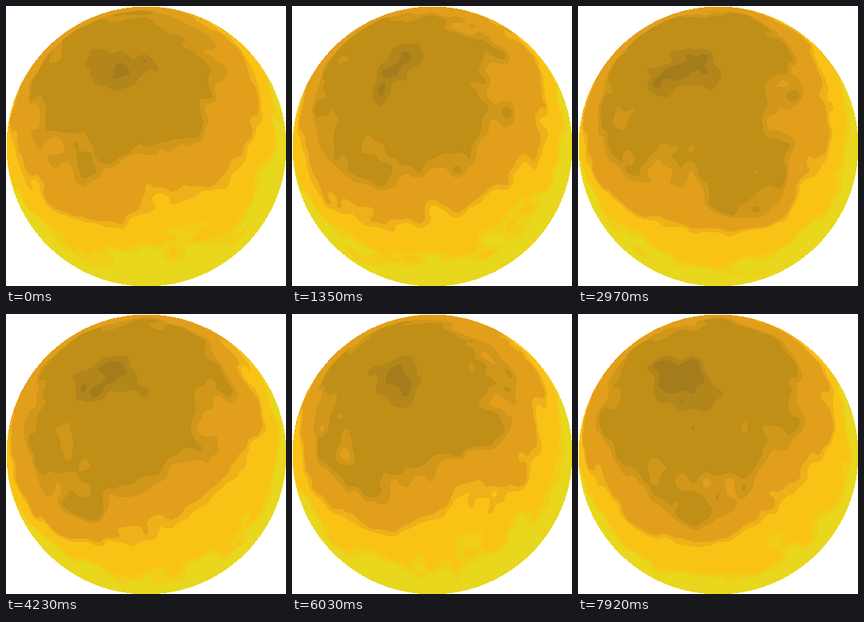
Write an HTML page with a canvas that moves like this. It is 350 px wide and 350 px high and loops after 8 s.

```html
<!DOCTYPE html>
<html>
<head>
<meta charset="utf-8">
<style>
  html, body { margin: 0; width: 100%; height: 100%; overflow: hidden; background: #fff; }
  canvas { display: block; width: 100%; height: 100%; }
</style>
</head>
<body>
<canvas id="stage" width="350" height="350"></canvas>
<script>
const SIZE = 350, MID = 175.5, RADIUS = 174.9;
const LOOP = 8000, STEP = 90;
const FOCUS = { x: 150, y: 120 };   // centre of the shadow
const LIGHT_ANGLE = 69;             // brightest direction, degrees clockwise from right
const COLORS = [[164, 124, 28], [191, 143, 23], [226, 159, 28], [249, 195, 22], [232, 215, 28]];

// The shadow's lower border swells (or, if negative, dents) around one wandering angle.
const SWELLS = [
  { at: 0, angle: 75, size: -0.2 },
  { at: 1350, angle: 130, size: 0.02 },
  { at: 2970, angle: 60, size: 0.27 },
  { at: 4230, angle: 122, size: 0.17 },
  { at: 6030, angle: 65, size: -0.17 },
  { at: 7110, angle: 122, size: 0.22 },
  { at: 7920, angle: 85, size: 0.22 }
];

const mix = (a, b, k) => a + (b - a) * k;
const smooth = k => k * k * (3 - 2 * k);

function hash(x, y, z) {
  let h = Math.imul(x, 374761393) ^ Math.imul(y, 668265263) ^ Math.imul(z, 1274126177);
  h = Math.imul(h ^ (h >>> 13), 1103515245);
  return ((h ^ (h >>> 16)) >>> 0) / 2147483648 - 1;
}

function noise(x, y, z) {
  const ix = Math.floor(x), iy = Math.floor(y), iz = Math.floor(z);
  const fx = smooth(x - ix), fy = smooth(y - iy), fz = smooth(z - iz);
  const row = (j, k) => mix(hash(ix, iy + j, iz + k), hash(ix + 1, iy + j, iz + k), fx);
  return mix(mix(row(0, 0), row(1, 0), fy), mix(row(0, 1), row(1, 1), fy), fz);
}

// Fixed geometry and lighting of every pixel on the globe.
const pixels = [];
for (let y = 0; y < SIZE; y++) {
  for (let x = 0; x < SIZE; x++) {
    const sx = (x + 0.5 - MID) / RADIUS, sy = (y + 0.5 - MID) / RADIUS;
    const depth = 1 - sx * sx - sy * sy;
    if (depth < 0) continue;
    const dx = x - FOCUS.x, dy = y - FOCUS.y, r = Math.hypot(dx, dy) || 1;
    const ox = FOCUS.x - MID, oy = FOCUS.y - MID;
    const along = (ox * dx + oy * dy) / r;
    const rim = Math.sqrt(along * along - ox * ox - oy * oy + RADIUS * RADIUS) - along;
    const angle = Math.atan2(dy, dx) * 180 / Math.PI;
    const light = (1 + Math.cos((angle - LIGHT_ANGLE) * Math.PI / 180)) / 2;
    pixels.push({
      sx, sy, sz: Math.sqrt(depth), angle, reach: Math.min(1, r / rim),
      brown: 0.96 - 0.55 * light ** 1.5,
      orange: 1.02 - 0.4 * light ** 2.5,
      dark: 0.75 * Math.exp(-(((x - 122) / 55) ** 2 + ((y - 73) / 44) ** 2)),
      index: (y * SIZE + x) * 4
    });
  }
}

function swellAt(time) {
  const i = Math.max(1, SWELLS.findIndex(s => s.at >= time));
  const a = SWELLS[i - 1], b = SWELLS[i];
  const k = smooth((time - a.at) / (b.at - a.at));
  return { angle: mix(a.angle, b.angle, k), size: mix(a.size, b.size, k) };
}

// Level 0 is the darkest zone, 4 the brightest.
function levelAt(p, swell, time) {
  const bulge = swell.size * Math.exp(-(((p.angle - swell.angle) / 28) ** 2));
  const brown = p.brown + bulge, orange = p.orange + bulge / 2, q = p.reach;
  let level;
  if (q < brown) level = 1.5 + 0.5 * (q / brown) ** 2 - p.dark;
  else if (q < orange) level = 2 + (q - brown) / (orange - brown);
  else level = 3 + (q - orange) / Math.max(0.08, 0.65 * (1 - orange));
  const x = p.sx + 7, y = p.sy + 3, z = p.sz + time / 4300;
  return level + 0.34 * noise(x * 5, y * 5, z * 5) + 0.18 * noise(x * 11, y * 11, z * 11);
}

const ctx = document.getElementById("stage").getContext("2d");
const image = ctx.createImageData(SIZE, SIZE);
image.data.fill(255);

function draw(time) {
  const swell = swellAt(time);
  for (const p of pixels) {
    const level = Math.max(0, Math.min(4.5, levelAt(p, swell, time)));
    const near = Math.round(level);
    // A half tone softens each border between two zones.
    const border = near > 0 && near < 5 && Math.abs(level - near) < 0.09;
    const a = COLORS[border ? near - 1 : Math.floor(level)];
    const b = border ? COLORS[near] : a;
    for (let c = 0; c < 3; c++) image.data[p.index + c] = (a[c] + b[c]) / 2;
  }
  ctx.putImageData(image, 0, 0);
}

let shown = -1;
function tick() {
  const step = Math.floor((performance.now() % LOOP) / STEP);
  if (step !== shown) draw((shown = step) * STEP);
  requestAnimationFrame(tick);
}
tick();
</script>
</body>
</html>
```
